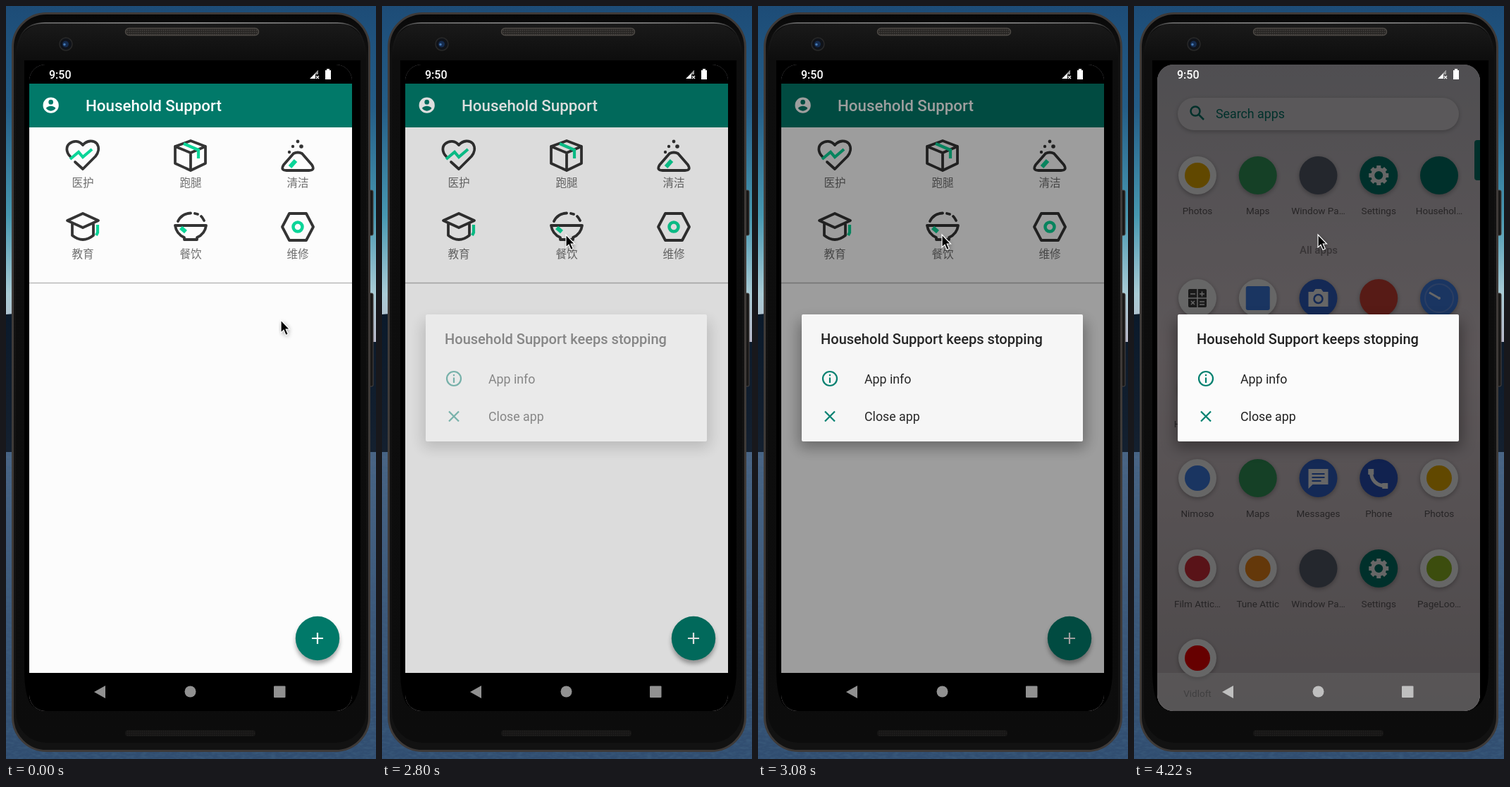
An HTML page for the animation above (6.22 s loop, 525 by 1067 pixels).

```html
<!DOCTYPE html>
<html lang="en">
<head>
<meta charset="utf-8">
<title>App keeps stopping</title>
<style>
html, body { margin: 0; width: 100%; height: 100%; overflow: hidden; background: #101d2c; }
svg { display: block; width: 100%; height: 100%; font-family: Roboto, sans-serif; }
.medium { font-weight: 500; }
.mid { text-anchor: middle; }
.cjk { font: 15.6px "Noto Sans CJK SC", "Noto Sans CJK", sans-serif; fill: #6f6f6f; }
.ink { fill: none; stroke: #343434; stroke-width: 3.8; stroke-linecap: round; stroke-linejoin: round; }
.accent { fill: none; stroke: #0bd598; stroke-width: 4.2; }
.label { font-size: 13.5px; fill: #5f5a5d; }
.glyph { fill: none; stroke: #fff; stroke-width: 3; }
</style>
</head>
<body>
<svg viewBox="0 0 525 1067" preserveAspectRatio="none">
<defs>
  <linearGradient id="sky" x2="0" y2="1">
    <stop stop-color="#1d4c77"/><stop offset=".3" stop-color="#245d87"/>
    <stop offset=".62" stop-color="#4798b1"/><stop offset=".85" stop-color="#a9cbd5"/>
    <stop offset="1" stop-color="#b9b7c8"/>
  </linearGradient>
  <linearGradient id="hill" x2="0" y2="1"><stop stop-color="#0b1a2b"/><stop offset="1" stop-color="#14202f"/></linearGradient>
  <linearGradient id="water" x2="0" y2="1"><stop stop-color="#4a6585"/><stop offset="1" stop-color="#304d70"/></linearGradient>
  <linearGradient id="frame" x2="0" y2="1">
    <stop stop-color="#060606"/><stop offset=".012" stop-color="#0a0a0a"/>
    <stop offset=".06" stop-color="#111"/><stop offset="1" stop-color="#121212"/>
  </linearGradient>
  <linearGradient id="glass" x2="0" y2="1">
    <stop stop-color="#1a1a1a"/><stop offset=".05" stop-color="#0e0e0e"/><stop offset="1" stop-color="#0c0c0c"/>
  </linearGradient>
  <linearGradient id="shine"><stop stop-color="#555" stop-opacity="0"/><stop offset=".08" stop-color="#777"/>
    <stop offset=".5" stop-color="#aaa"/><stop offset=".92" stop-color="#777"/><stop offset="1" stop-color="#555" stop-opacity="0"/></linearGradient>
  <linearGradient id="drawer" x2="0" y2="1">
    <stop stop-color="#c8c5cc"/><stop offset=".45" stop-color="#e8dadf"/><stop offset="1" stop-color="#c2b8bc"/>
  </linearGradient>
  <pattern id="mesh" width="3" height="3" patternUnits="userSpaceOnUse">
    <rect width="3" height="3" fill="#292725"/><circle cx="1.5" cy="1.5" r=".8" fill="#4a4744"/>
  </pattern>
  <filter id="ripples" x="0" y="0" width="100%" height="100%">
    <feTurbulence type="fractalNoise" baseFrequency=".12 .3" numOctaves="2" seed="4"/>
    <feColorMatrix values="0 0 0 0 .05  0 0 0 0 .12  0 0 0 0 .22  2 0 0 0 -.75"/>
  </filter>
  <filter id="soft" x="-30%" y="-50%" width="160%" height="200%"><feGaussianBlur stdDeviation="10"/></filter>
  <filter id="softSmall" x="-30%" y="-30%" width="160%" height="160%"><feGaussianBlur stdDeviation="3"/></filter>
  <clipPath id="screen"><rect x="33" y="83" width="458" height="916" rx="23"/></clipPath>
</defs>

<!-- wallpaper -->
<rect width="525" height="480" fill="url(#sky)"/>
<path d="M0 437L12 436L510 476H525V634H0Z" fill="url(#hill)"/>
<rect y="632" width="525" height="435" fill="url(#water)"/>
<rect y="632" width="525" height="435" filter="url(#ripples)" opacity=".6"/>

<!-- phone -->
<g stroke="#4a4542" fill="#1a1918">
  <rect x="514" y="261" width="7" height="64" rx="2"/>
  <rect x="514" y="407" width="7" height="132" rx="2"/>
</g>
<rect x="9.5" y="10.5" width="506" height="1045" rx="48" fill="url(#frame)" stroke="#3e3a38" stroke-width="3"/>
<rect x="14" y="24" width="497" height="1020" rx="43" fill="url(#glass)"/>
<path d="M15 72Q15 24 55 24H470Q510 24 510 72" fill="none" stroke="url(#shine)" stroke-width="1.6"/>
<path d="M26 77H503V940Q503 985 484 994H40Q26 985 26 940Z"/>
<rect x="169.5" y="31.5" width="189" height="10" rx="5" fill="url(#mesh)" stroke="#4b4743" stroke-width="1.5"/>
<rect x="169.5" y="1026.5" width="184" height="8" rx="3" fill="url(#mesh)" stroke="#242322" opacity=".4"/>
<circle cx="85" cy="54" r="9" fill="#101319" stroke="#292929" stroke-width="1.5"/>
<circle cx="84.5" cy="54" r="4.5" fill="#152c50"/>
<circle cx="83" cy="54.5" r="1.7" fill="#4578b2"/>

<g clip-path="url(#screen)">
  <g id="launcher">
    <rect x="33" y="83" width="458" height="916" fill="url(#drawer)"/>
    <rect x="62" y="132" width="399" height="46" rx="23" opacity=".25" filter="url(#softSmall)"/>
    <rect x="62" y="130" width="399" height="46" rx="23" fill="#e2dee1"/>
    <g fill="none" stroke="#00796b" stroke-width="2.5"><circle cx="87" cy="149" r="6.5"/><path d="M92 154L99 161"/></g>
    <text x="116" y="159" font-size="17.8" fill="#00796b">Search apps</text>
    <path d="M491 190H487Q483 190 483 194V243Q483 247 487 247H491Z" fill="#00796b"/>
    <text x="262" y="351" class="mid medium" font-size="15" fill="#8c8488">All apps</text>
    <g id="icons"></g>
    <rect x="33" y="945" width="458" height="54" fill="#fff" opacity=".4"/>
    <rect x="33" y="83" width="458" height="916" opacity=".6"/>
  </g>

  <g id="app">
    <rect x="33" y="83" width="458" height="916"/>
    <rect x="33" y="110" width="458" height="835" fill="#fcfcfc"/>
    <rect x="33" y="110" width="458" height="62" fill="#017969"/>
    <path transform="translate(50.3 127.3) scale(1.114)" fill="#fff" d="M12 2a10 10 0 100 20 10 10 0 000-20zm0 3a3 3 0 110 6 3 3 0 010-6zm0 14.2c-2.5 0-4.7-1.3-6-3.2 0-2 4-3.1 6-3.1s6 1.1 6 3.1c-1.3 1.9-3.5 3.2-6 3.2z"/>
    <text x="113" y="149" class="medium" font-size="22.3" fill="#fff">Household Support</text>

    <g class="ink">
      <path d="M91 213C85 207 85 199 90 195C96 190 104 191 109 197C115 190 124 190 129 195C133 201 131 208 127 213L109 231L98 221"/>
      <path d="M262 191L283 199V223L262 233L240 223V199ZM240 199L262 208L283 199M262 208V233"/>
      <path d="M408 209Q414 206 420 209L434 225Q439 233 430 233H398Q389 233 394 225Z"/>
      <path d="M109 294L131 304L109 314L87 304ZM94 309V325Q109 337 124 325V309"/>
      <path d="M240 311H284A22 22 0 0 1 271 328V331H253V328A22 22 0 0 1 240 311ZM244 305A20 20 0 0 1 262 293.5M268 294L272 295M277 298Q279 300 281 304"/>
      <path d="M402 294H426L436 313L426 332H402L392 313Z"/>
    </g>
    <g fill="#343434"><circle cx="402" cy="207" r="2.2"/><circle cx="414" cy="192" r="2.4"/><circle cx="407" cy="199" r="2.2"/><circle cx="419" cy="199" r="2.8"/></g>
    <g class="accent">
      <path d="M91 217L103 207L109 214L122 203"/>
      <path d="M252 195L273 204V216"/>
      <path d="M403 228L411 219" stroke-width="6"/>
      <path d="M130 310V321L128 325"/>
      <path d="M248 314L255 320" stroke-width="6"/>
      <circle cx="414" cy="313" r="6.5" stroke-width="4.5"/>
    </g>
    <g class="cjk mid">
      <text x="109" y="255.5">医护</text><text x="262" y="255.5">跑腿</text><text x="414" y="255.5">清洁</text>
      <text x="109" y="356.5">教育</text><text x="262" y="356.5">餐饮</text><text x="414" y="356.5">维修</text>
    </g>
    <path d="M33 392.5H491" stroke="#b9b9b9" stroke-width="1.3"/>
    <circle cx="442" cy="901" r="31" opacity=".35" filter="url(#softSmall)"/>
    <circle cx="442" cy="896" r="31.2" fill="#017969"/>
    <path d="M434 896H450M442 888V904" stroke="#fff" stroke-width="2.2"/>
    <rect id="dim" x="33" y="110" width="458" height="835"/>
  </g>

  <g id="dialog">
    <rect x="58" y="446" width="407" height="180" rx="6" opacity=".34" filter="url(#soft)"/>
    <rect x="62" y="437" width="399" height="180" rx="2" fill="#fbfbfb"/>
    <g fill="#212121">
      <text x="89" y="478.5" class="medium" font-size="20.05">Household Support keeps stopping</text>
      <text x="151" y="535" font-size="17.8">App info</text>
      <text x="151" y="588" font-size="17.8">Close app</text>
    </g>
    <g fill="none" stroke="#00806f" stroke-width="2.2">
      <circle cx="102" cy="528" r="10"/><path d="M102 526.5V534M102 522V524.3M95 574.5L109 588.5M109 574.5L95 588.5"/>
    </g>
  </g>

  <text x="61" y="102.5" class="medium" font-size="16" fill="#fff">9:50</text>
  <path d="M431 103L443 91V97H439V103Z" fill="#fff"/>
  <path d="M443 91V97H439V95Z" fill="#999"/>
  <path d="M440 99L444 103M444 99L440 103" stroke="#fff" stroke-width="1.2"/>
  <path d="M453 91H455V89H459V91H461V104H453Z" fill="#fff"/>
  <g id="nav"><path d="M125 972L141 963V981Z"/><circle cx="261.5" cy="971.5" r="8"/><rect x="380" y="963.5" width="16.5" height="16.5" rx="1"/></g>
</g>

<g id="cursor">
  <path d="M0 0V18L4 14.3L7 21.5L10.3 20L7.2 13H12.5Z" transform="translate(1 2)" opacity=".4" filter="url(#softSmall)"/>
  <path d="M0 0V18L4 14.3L7 21.5L10.3 20L7.2 13H12.5Z" stroke="#fff" stroke-width="1.2"/>
</g>
</svg>

<script>
const LOOP = 6220;
const $ = id => document.getElementById(id);
const TILE = '#fff', TEAL = '#00796b', BLUE = '#3367d6', DARK = '#424242';

const teeth = Array.from({ length: 8 }, (_, i) => `<path d="M-3 -14H3V-8H-3Z" transform="rotate(${i * 45})" fill="#fff" stroke="none"/>`).join('');
const glyphs = {
  gear: `${teeth}<circle r="8.5" stroke-width="5"/>`,
  bubble: `<path d="M-14 -13H14V9H-8L-14 15Z" fill="#fff" stroke="none"/><path d="M-9 -6H9M-9 -1H9M-9 4H4" stroke="${BLUE}" stroke-width="2"/>`,
  handset: '<path d="M-11 -10C-11 3 -3 11 10 11" stroke-width="5"/><path d="M-11 -13V-5M5 11H13" stroke-width="8"/>',
  camera: `<path d="M-14 -9H-7L-4 -13H4L7 -9H14V12H-14Z" fill="#fff" stroke="none"/><circle cy="1" r="6" stroke="${BLUE}" stroke-width="2.5"/>`,
  clock: '<circle r="20" stroke="#6c9cf5" stroke-width="2"/><path d="M0 0L-14 -8"/><circle r="2" fill="#fff" stroke="none"/>',
  calculator: `<rect x="-13" y="-13" width="26" height="26" rx="2" fill="${DARK}" stroke="none"/><path d="M-13 0H13M0 -13V13" stroke-width="1.5"/><path d="M-10 -6H-3M3 -6H10M6.5 -9.5V-2.5M-9 4L-4 9M-4 4L-9 9M3 5H10M3 9H10" stroke-width="1.5"/>`,
  square: '<rect x="-17" y="-17" width="34" height="34" rx="3" fill="#4285f4" stroke="none"/>'
};
const disc = colour => `<circle r="18" fill="${colour}" stroke="none"/>`;

// Each app: label, tile colour, inner artwork
const photos = ['Photos', TILE, disc('#f4b400')];
const maps = ['Maps', '#34a060', ''];
const keeper = ['Window Pa…', '#5a6272', ''];
const settings = ['Settings', TEAL, glyphs.gear];
const household = ['Househol…', TEAL, ''];
const rows = [
  [240, [photos, maps, keeper, settings, household]],
  [414, [['', TILE, glyphs.calculator], ['', TILE, glyphs.square], ['', BLUE, glyphs.camera], ['', '#db4437', ''], ['', '#4285f4', glyphs.clock]]],
  [542, [household]],
  [669, [['Nimoso', TILE, disc('#4285f4')], maps, ['Messages', BLUE, glyphs.bubble], ['Phone', '#2a56c6', glyphs.handset], photos]],
  [797, [['Film Attic…', TILE, disc('#e0303c')], ['Tune Attic', TILE, disc('#fb8c1a')], keeper, settings, ['PageLoo…', TILE, disc('#97c024')]]],
  [924, [['Vidloft', TILE, disc('#f00')]]]
];
$('icons').innerHTML = rows.map(([y, apps]) => apps.map(([label, colour, art], i) => `
  <g transform="translate(${90 + i * 85.75} ${y})">
    <circle cy="2" r="27" opacity=".3" filter="url(#softSmall)"/>
    <circle r="27" fill="${colour}"/><g class="glyph">${art}</g>
    <text y="54.5" class="label mid">${label}</text>
  </g>`).join('')).join('');

const clamp = x => Math.max(0, Math.min(1, x));
const smooth = x => x * x * (3 - 2 * x);

// Piecewise interpolation over [time, value] points
function track(points, t, ease = x => x) {
  let [t0, v0] = points[0];
  for (const [t1, v1] of points) {
    if (t < t1) return v0 + (v1 - v0) * ease(clamp((t - t0) / (t1 - t0)));
    [t0, v0] = [t1, v1];
  }
  return v0;
}

const dimming = [[2640, 0], [2840, .16], [3080, .38], [3220, .6]];
const cursorX = [[0, 390], [580, 264], [660, 264], [720, 263], [840, 261]];
const cursorY = [[0, 445], [580, 329], [660, 329], [720, 327], [840, 324]];

function draw(t) {
  const leaving = clamp(Math.floor((t - 4020) / 40) / 5);
  const appear = clamp((t - 2660) / 540);
  $('cursor').setAttribute('transform', `translate(${track(cursorX, t, smooth)} ${track(cursorY, t, smooth)})`);
  $('dim').setAttribute('opacity', track(dimming, t));
  $('dialog').setAttribute('opacity', 1 - (1 - appear) ** 2);
  $('app').setAttribute('opacity', 1 - leaving);
  const grey = 145 + 46 * leaving;
  $('nav').setAttribute('fill', `rgb(${grey},${grey},${grey})`);
}

const start = performance.now();
function tick() {
  draw((performance.now() - start) % LOOP);
  requestAnimationFrame(tick);
}
tick();
</script>
</body>
</html>
```
